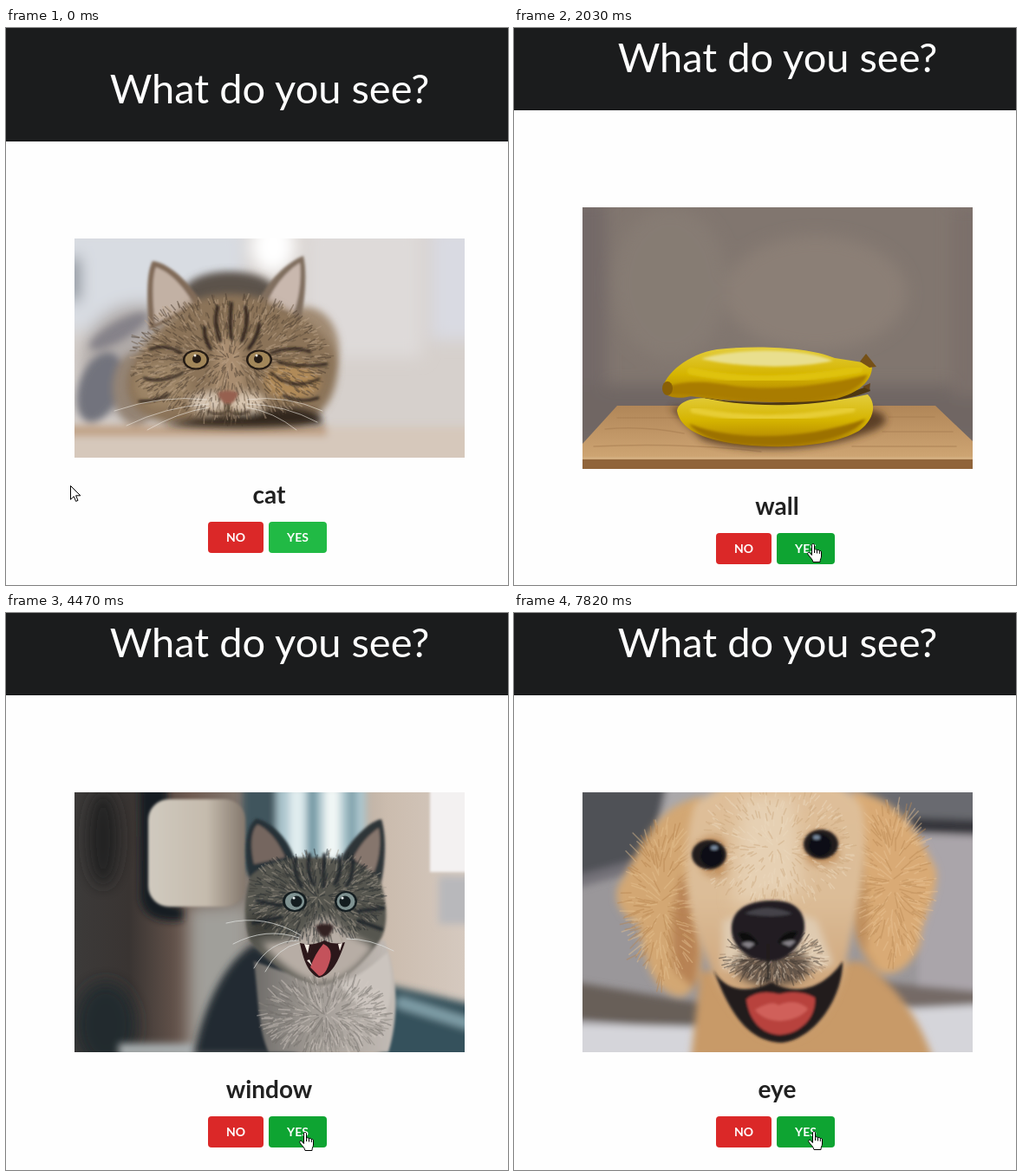
Write an HTML page that moves like this. It is 579 px wide and 643 px high and loops after 8 s.

```html
<!DOCTYPE html>
<html lang="en">
<head>
<meta charset="utf-8">
<title>What do you see?</title>
<style>
  html, body { margin: 0; width: 100%; height: 100%; overflow: hidden; background: #fefefe; }
  #stage { display: block; width: 100vw; height: 100vh; }
  text { font-family: Lato, "Open Sans", sans-serif; text-anchor: middle; }
  #title { font-size: 47px; fill: #fff; }
  #label { font-size: 28px; font-weight: 700; fill: #212121; }
  .btn { font-size: 14px; font-weight: 700; fill: #fff; }
  .pic { display: none; }
  .pic path { stroke-linecap: round; }
  .pic path:not([fill]) { fill: none; }
  [data-fur] { filter: url(#fuzz); stroke-width: 1.5; }
  .soft { filter: url(#soft); }
  .blur { filter: url(#blur); }
  .haze { filter: url(#haze); }
  .cursor { fill: #fff; stroke: #000; stroke-linejoin: round; }
</style>
</head>
<body>
<svg id="stage" viewBox="0 0 579 643">
  <defs>
    <filter id="fuzz"><feGaussianBlur stdDeviation=".7"/></filter>
    <filter id="soft"><feGaussianBlur stdDeviation="1.4"/></filter>
    <filter id="blur" x="-20%" y="-20%" width="140%" height="140%"><feGaussianBlur stdDeviation="4"/></filter>
    <filter id="haze" x="-30%" y="-30%" width="160%" height="160%"><feGaussianBlur stdDeviation="9"/></filter>
    <linearGradient id="wood" x2="0" y2="1"><stop stop-color="#b08658"/><stop offset="1" stop-color="#cfa674"/></linearGradient>
    <linearGradient id="peel" x2="0" y2="1"><stop stop-color="#e3cd3c"/><stop offset=".5" stop-color="#d5b400"/><stop offset="1" stop-color="#a97a02"/></linearGradient>
    <linearGradient id="room"><stop stop-color="#3c3a39"/><stop offset=".14" stop-color="#393432"/><stop offset=".3" stop-color="#705c52"/><stop offset=".5" stop-color="#8d8780"/><stop offset=".8" stop-color="#cbbcae"/><stop offset="1" stop-color="#d5c9bf"/></linearGradient>
    <linearGradient id="lamp"><stop stop-color="#d0cabf"/><stop offset=".6" stop-color="#c5bbad"/><stop offset="1" stop-color="#83776c"/></linearGradient>
    <linearGradient id="chest"><stop stop-color="#6d6b68"/><stop offset=".4" stop-color="#a09a94"/><stop offset="1" stop-color="#c3bcb6"/></linearGradient>
    <linearGradient id="face" x2="0" y2="1"><stop stop-color="#dfbf99"/><stop offset=".45" stop-color="#dcbd98"/><stop offset="1" stop-color="#c7996b"/></linearGradient>
  </defs>

  <rect id="head" width="579" fill="#1b1c1d"/>
  <text id="title" x="304">What do you see?</text>

  <!-- resting tabby -->
  <svg class="pic" x="79" y="243" width="450" height="253" viewBox="79 243 450 253">
    <rect x="79" y="243" width="450" height="253" fill="#d6d0cc"/>
    <g class="haze">
      <rect x="60" y="230" width="215" height="120" fill="#d8dce2"/>
      <rect x="345" y="230" width="135" height="150" fill="#dedad9"/>
      <rect x="490" y="230" width="60" height="130" fill="#d9dae2"/>
      <ellipse cx="308" cy="252" rx="26" ry="32" fill="#fff"/>
      <rect x="70" y="265" width="14" height="50" fill="#606a76"/>
      <ellipse cx="155" cy="385" rx="68" ry="67" fill="#b0aaa8"/>
    </g>
    <g class="blur">
      <rect x="70" y="460" width="470" height="45" fill="#d6c8bb"/>
      <rect x="70" y="459" width="300" height="12" fill="#bfa084"/>
      <ellipse cx="108" cy="415" rx="24" ry="42" fill="#72737d" transform="rotate(20 108 415)"/>
      <ellipse cx="130" cy="350" rx="38" ry="11" fill="#858289" transform="rotate(-30 130 350)"/>
      <ellipse cx="150" cy="416" rx="27" ry="42" fill="#948474"/>
      <ellipse cx="258" cy="305" rx="53" ry="24" fill="#5c534c"/>
      <ellipse cx="345" cy="370" rx="39" ry="48" fill="#a18b73"/>
    </g>
    <g class="soft">
      <path fill="#806b58" d="M165 349C162 310 162 282 169 269C192 272 216 300 228 321Z"/>
      <path fill="#c2b1a4" d="M172 341C168 308 169 286 173 276C192 283 207 302 217 320Z"/>
      <path fill="#806e5f" d="M288 322C300 292 325 270 343 263C348 285 344 320 339 341Z"/>
      <path fill="#c9b8ae" d="M300 320C309 296 327 278 339 271C341 288 338 315 331 330Z"/>
    </g>
    <path class="blur" fill="#8b7359" d="M207 322C228 302 288 302 316 322C348 336 382 360 382 390C383 426 363 454 332 459C290 463 215 462 184 456C150 447 134 428 142 398C153 368 176 344 207 322Z"/>
    <g class="blur">
      <ellipse cx="330" cy="408" rx="32" ry="21" fill="#b08a58"/>
      <ellipse cx="180" cy="412" rx="32" ry="26" fill="#9c8466"/>
      <path fill="#32281f" d="M182 458Q240 446 285 444Q325 430 362 446L365 457Q280 464 182 458Z"/>
      <ellipse cx="234" cy="432" rx="22" ry="12" fill="#d5c5b2"/>
      <ellipse cx="277" cy="432" rx="22" ry="12" fill="#d8c6b1"/>
      <path fill="#a98d6f" d="M244 355L268 355L276 415L256 432L238 414Z"/>
    </g>
    <g data-fur="258 382 112 70 1300 9 #43362b #bda489 #65523f"/>
    <g class="soft" fill="none" stroke="#2e241c" stroke-width="4">
      <path d="M229 346Q228 358 236 370M244 322Q239 343 247 361M260 318Q257 340 260 358M276 322Q281 340 272 361M292 342Q291 356 280 370"/>
      <path stroke-width="3" d="M202 375Q184 364 166 371M204 398Q181 411 159 404M306 375Q330 366 351 374M306 398Q330 420 361 405M315 386Q340 393 370 388M188 423Q174 431 154 431M320 424Q340 434 360 427"/>
    </g>
    <g fill="#241b14">
      <ellipse cx="219" cy="383" rx="15" ry="11.5"/><ellipse cx="292" cy="383" rx="15" ry="11.5"/>
      <g fill="#a18659"><ellipse cx="219" cy="383" rx="12.5" ry="9.5"/><ellipse cx="292" cy="383" rx="12.5" ry="9.5"/></g>
      <circle cx="220" cy="382" r="5"/><circle cx="291" cy="382" r="5"/>
      <g fill="#efe9df"><circle cx="218" cy="378" r="1.5"/><circle cx="289" cy="378" r="1.5"/></g>
    </g>
    <path class="soft" fill="#966150" d="M244 421Q256 416 268 421Q265 432 256 435Q247 432 244 421Z"/>
    <path class="soft" stroke="#37291f" stroke-width="2" d="M256 434V442Q245 449 232 442M256 442Q268 449 281 442"/>
    <path stroke="#eee9e2" stroke-width="1" opacity=".6" d="M232 429Q180 423 125 442M234 434Q184 437 139 459M234 438Q197 444 163 464M278 429Q323 423 365 442M278 434Q322 435 359 455M278 438Q309 443 335 464"/>
  </svg>

  <!-- fruit on a board -->
  <svg class="pic" x="79" y="207" width="450" height="302" viewBox="79 207 450 302">
    <rect x="79" y="207" width="450" height="302" fill="#81766f"/>
    <g class="haze">
      <rect x="60" y="200" width="46" height="260" fill="#736967"/>
      <rect x="60" y="412" width="490" height="70" fill="#706664"/>
      <ellipse cx="348" cy="306" rx="105" ry="66" fill="#8b7f76"/>
      <ellipse cx="180" cy="295" rx="66" ry="88" fill="#867b73"/>
      <rect x="505" y="205" width="40" height="220" fill="#7b706b"/>
    </g>
    <path fill="url(#wood)" d="M119 436H486L529 477V498H79V480Z"/>
    <path stroke="#a77d51" stroke-width="1.5" opacity=".55" d="M119 450H190M105 463Q150 459 196 468M92 483Q190 478 285 489M390 483H510M425 466H506M432 449H485"/>
    <rect x="79" y="497" width="450" height="12" fill="#90643a"/>
    <rect x="79" y="495" width="450" height="3" fill="#d2ad7e"/>
    <path class="blur" fill="#4c321e" opacity=".85" d="M180 438L410 440C442 448 430 461 400 470C350 490 260 491 217 475Z"/>
    <path fill="url(#peel)" d="M188 442C190 428 216 424 242 430C300 437 366 433 408 423C419 434 415 453 398 465C367 483 310 486 265 481C219 476 192 464 188 442Z"/>
    <path class="soft" fill="#9c7103" d="M202 457C250 476 330 478 406 451C390 475 330 484 275 481C235 480 211 469 202 457Z"/>
    <path class="soft" stroke="#e7cd36" stroke-width="7" d="M207 441Q290 459 390 440"/>
    <path fill="#4e3711" d="M212 425C270 438 360 434 409 413L411 419C360 440 260 439 212 425Z"/>
    <path fill="url(#peel)" d="M172 416C173 401 200 376 234 371C280 366 338 368 370 381L402 386L413 389C414 407 398 421 372 428C330 435 250 432 204 425C184 430 171 424 172 416Z"/>
    <path class="soft" fill="#e9df8e" d="M216 382C250 370 330 368 368 384C320 395 255 391 216 382Z"/>
    <path class="soft" fill="#a97c03" d="M177 414C200 406 225 408 258 414C300 419 360 413 408 400C400 419 370 428 330 430C265 432 225 423 178 423Z"/>
    <path class="soft" stroke="#dfc20f" stroke-width="8" d="M204 396Q290 415 398 394"/>
    <path fill="#765117" d="M399 385L406 376L418 391L410 392Z"/>
    <path fill="#66451c" d="M402 414L411 410L410 418Z"/>
    <ellipse cx="177" cy="416" rx="6" ry="8" fill="#896006"/>
  </svg>

  <!-- meowing cat -->
  <svg class="pic" x="79" y="207" width="450" height="300" viewBox="79 207 450 300">
    <rect x="79" y="207" width="450" height="300" fill="url(#room)"/>
    <g class="haze">
      <ellipse cx="112" cy="260" rx="18" ry="55" fill="#202324"/>
      <ellipse cx="115" cy="475" rx="35" ry="49" fill="#20292d"/>
      <rect x="211" y="338" width="70" height="180" fill="#a09f9a"/>
    </g>
    <g class="blur">
      <path fill="#121b20" d="M154 200H186V335L204 340V355Q160 360 155 330Z"/>
      <rect x="273" y="200" width="41" height="100" fill="#40555d"/>
      <rect x="312" y="200" width="103" height="100" fill="#acc6ce"/>
      <rect x="327" y="200" width="17" height="90" fill="#e1edef"/>
      <rect x="349" y="200" width="9" height="90" fill="#668e9a"/>
      <rect x="367" y="200" width="18" height="85" fill="#f1f7f6"/>
      <rect x="395" y="200" width="8" height="75" fill="#7599a3"/>
      <rect x="499" y="304" width="40" height="55" fill="#b8b8bb"/>
      <path fill="#36515c" d="M440 429L540 452V520H430Z"/>
      <path stroke="#809fa8" stroke-width="13" d="M456 450L540 476"/>
      <rect x="130" y="497" width="90" height="15" fill="#a9afb0"/>
    </g>
    <g class="soft">
      <rect x="164" y="215" width="112" height="124" rx="24" fill="url(#lamp)"/>
      <rect x="489" y="200" width="45" height="99" fill="#f3f1f1"/>
    </g>
    <path class="blur" fill="#202c32" d="M217 510C226 459 252 400 287 382L345 430L335 510Z"/>
    <g class="soft">
      <path fill="url(#chest)" d="M286 402C291 444 291 482 303 507H441C452 473 454 419 436 377L350 425Z"/>
      <path fill="#cbc4be" d="M385 428C414 417 431 399 440 392C449 430 444 460 430 476Q407 455 385 428Z"/>
      <path fill="#273137" d="M281 307C273 277 276 245 289 237C308 242 327 263 333 284Z"/>
      <path fill="#75665e" d="M286 290C281 267 283 251 290 244C304 250 316 267 322 282Z"/>
      <path fill="#2e3538" d="M386 284C397 262 419 240 433 238C440 260 437 297 430 322Z"/>
      <path fill="#86766d" d="M400 284C408 266 422 253 430 248C433 266 430 287 424 300Z"/>
      <path fill="#57564f" d="M282 304C310 275 397 273 431 307C440 335 443 366 427 384C408 409 385 430 360 430C333 426 300 402 281 378C273 354 275 326 282 304Z"/>
    </g>
    <g class="blur">
      <path fill="#b7ada5" d="M359 352L376 352L394 370Q415 379 424 386C408 408 385 428 361 428C338 424 308 399 295 380Q325 382 346 367Z"/>
      <path fill="#3c3c39" d="M281 345L318 352L309 370L284 374Z"/>
    </g>
    <g data-fur="359 328 75 50 850 9 #1f272a #a49b8e #3a3b38"/>
    <g data-fur="368 464 70 40 600 13 #6d6964 #d2cbc4 #8d8882"/>
    <g class="soft" fill="none" stroke="#20272a" stroke-width="4">
      <path d="M334 284Q331 301 341 316M350 279Q346 299 355 314M367 279Q367 300 366 316M384 281Q389 298 379 313M400 285Q401 302 393 315M317 338L289 332M318 351L285 358M407 344L435 341M406 355L433 365"/>
    </g>
    <g fill="#141d20">
      <ellipse cx="333" cy="333" rx="14" ry="12"/><ellipse cx="392" cy="333" rx="13" ry="12"/>
      <g fill="#7f9291"><ellipse cx="333" cy="333" rx="11" ry="10"/><ellipse cx="392" cy="333" rx="10.5" ry="10"/></g>
      <circle cx="335" cy="333" r="6.5"/><circle cx="391" cy="333" r="6.5"/>
      <g fill="#e8efee"><circle cx="332" cy="329" r="1.6"/><circle cx="388" cy="329" r="1.6"/></g>
    </g>
    <path class="soft" fill="#332323" d="M357 361Q368 356 378 361Q376 371 368 375Q360 372 357 361Z"/>
    <path fill="#2c171a" d="M339 381Q354 385 367 378Q379 384 391 380C386 395 378 418 361 421C348 416 343 400 339 381Z"/>
    <path fill="#c4525b" d="M351 409Q356 394 366 382Q377 387 374 400Q369 419 361 419Z"/>
    <path fill="#f2eae1" d="M344 382L350 383L348 393ZM383 382L388 381L385 390ZM347 401L350 400L353 407Z"/>
    <path stroke="#dfe2df" stroke-width="1" opacity=".75" d="M340 372Q298 347 254 358M338 375Q300 362 262 382M337 378Q304 378 286 410M338 381Q313 386 299 414M393 376Q420 376 447 390"/>
  </svg>

  <!-- cat looking up -->
  <svg class="pic" x="79" y="207" width="450" height="300" viewBox="79 207 450 300">
    <rect x="79" y="207" width="450" height="300" fill="#2e2323"/>
    <g class="haze">
      <rect x="70" y="200" width="75" height="180" fill="#160e0f"/>
      <ellipse cx="202" cy="220" rx="45" ry="32" fill="#50453f"/>
      <path fill="#62564f" d="M245 190H455C496 260 480 326 436 372L370 330Z"/>
      <path fill="#443635" d="M70 432Q250 396 540 462V520H70Z"/>
      <rect x="496" y="195" width="50" height="180" fill="#1c1214"/>
      <ellipse cx="180" cy="311" rx="22" ry="48" fill="#63574f"/>
    </g>
    <path class="blur" stroke="#392e2b" stroke-width="8" opacity=".7" d="M410 213Q431 250 413 294M438 220Q456 272 432 322M463 240Q474 281 451 334"/>
    <path class="blur" stroke="#584747" stroke-width="4" d="M90 459Q145 441 202 475M102 493Q169 461 224 501M298 474Q350 500 420 476M361 498Q429 467 496 494M437 441Q481 442 517 470"/>
    <path class="blur" fill="#82756a" d="M190 304C201 280 236 261 262 250C303 236 341 249 376 275C401 297 407 334 393 370C380 398 346 433 300 440C260 443 223 429 210 396C192 365 184 332 190 304Z"/>
    <g class="soft">
      <path fill="#8c7b72" d="M195 314C170 291 158 258 156 240C158 230 176 232 192 235C212 243 231 257 244 270Z"/>
      <path fill="#c9bfc0" d="M197 306C176 285 164 259 162 241C177 237 207 248 235 270Q207 278 197 306Z"/>
      <path fill="#8c7b71" d="M324 266C342 235 376 205 399 207C402 231 396 268 390 288Z"/>
      <path fill="#c0b4b2" d="M340 259C357 233 378 216 393 213C395 238 389 263 384 276Q367 252 340 259Z"/>
    </g>
    <g class="blur">
      <path fill="#ad9e92" d="M278 346L316 341C320 371 331 390 343 404L306 443C263 442 234 423 223 395L286 386Z"/>
      <ellipse cx="237" cy="420" rx="22" ry="17" fill="#f4f1f3"/>
      <ellipse cx="287" cy="429" rx="37" ry="15" fill="#e9e3e1"/>
      <ellipse cx="371" cy="434" rx="31" ry="24" fill="#dcd6d6"/>
      <ellipse cx="364" cy="441" rx="20" ry="17" fill="#fff"/>
      <path fill="#eee8e3" d="M205 370L238 380L258 396L226 395Z"/>
      <path fill="#e2dad4" d="M274 345L283 350L280 380L271 372Z"/>
    </g>
    <g data-fur="294 332 98 76 1250 9 #4d433d #b7aa9d #6b6058"/>
    <g class="soft" fill="none" stroke="#302722" stroke-width="3.5">
      <path d="M257 249Q252 280 278 313M270 244Q269 280 288 326M284 240Q285 287 296 328M298 239Q301 286 304 326M310 245Q320 284 311 322M326 255Q335 286 319 317"/>
      <path stroke-width="3" d="M237 334Q212 325 191 335M234 351Q211 350 196 361M363 326Q385 320 398 331M363 342Q384 344 398 354M355 361Q374 360 383 373"/>
    </g>
    <g fill="#171b1a">
      <ellipse cx="255" cy="354" rx="19" ry="16" transform="rotate(18 255 354)"/>
      <ellipse cx="342" cy="340" rx="18" ry="16" transform="rotate(-28 342 340)"/>
      <g fill="#9aab98"><circle cx="255" cy="353" r="14.5"/><circle cx="342" cy="339" r="14.5"/></g>
      <ellipse cx="255" cy="351" rx="5" ry="8"/><ellipse cx="341" cy="337" rx="5" ry="8"/>
      <g fill="#eef3ee"><circle cx="251" cy="347" r="2.5"/><circle cx="338" cy="332" r="2.5"/></g>
    </g>
    <path class="soft" fill="#a87867" d="M293 405Q307 401 320 402Q317 414 309 419Q299 414 293 405Z"/>
    <path class="soft" stroke="#66534b" stroke-width="2" d="M301 412L309 419L316 410M309 420Q306 428 296 430"/>
    <path stroke="#d6ced0" stroke-width="1" opacity=".55" d="M258 318Q251 250 258 207M317 292Q312 252 306 211M340 301Q370 284 408 289M226 405Q170 425 113 422M232 421Q175 440 139 497M241 426Q193 442 164 488M255 429Q224 459 207 507M266 431Q230 474 214 505M274 435Q254 457 248 482M358 394Q410 351 465 382M365 401Q426 387 505 360M362 402Q420 406 493 415M367 405Q423 417 467 438M376 409Q434 432 467 489M383 415Q417 444 428 490M208 376Q180 371 150 345"/>
  </svg>

  <!-- smiling dog -->
  <svg class="pic" x="79" y="207" width="450" height="300" viewBox="79 207 450 300">
    <rect x="79" y="207" width="450" height="300" fill="#9a979a"/>
    <g class="blur">
      <path fill="#505157" d="M70 200H178L170 285L70 309Z"/>
      <path fill="#aaa8aa" d="M176 200H245V250H165Z"/>
      <path fill="#737178" d="M70 304L158 280V294L70 318Z"/>
      <path fill="#696a70" d="M400 200H540V250L420 238Z"/>
      <path fill="#35363b" d="M455 236L540 239V257L463 253Z"/>
      <rect x="466" y="257" width="75" height="180" fill="#aaa5aa"/>
      <path fill="#675e59" d="M70 426L220 451V484L70 469Z"/>
      <path fill="#756b66" d="M410 425L540 437V459L410 455Z"/>
      <path fill="#d5d5da" d="M70 474L220 478V520H70ZM430 458L540 452V520H420Z"/>
    </g>
    <g class="blur">
      <path fill="#c89a68" d="M204 514L215 414L400 402C438 425 467 467 483 514Z"/>
      <path fill="#d3a773" d="M218 212C162 221 151 265 120 315C113 336 127 351 143 359C149 399 160 441 194 443C221 432 222 381 212 331Z"/>
      <path fill="#d9aa75" d="M389 206C442 210 466 253 487 296C491 328 468 355 469 382C456 413 435 421 421 414C394 396 386 350 380 300Z"/>
      <path fill="#b88355" d="M194 301Q177 353 185 413L207 433Q221 380 205 323Z"/>
      <path fill="#c0905f" d="M395 270Q414 325 407 390L422 413Q390 387 383 320Z"/>
    </g>
    <g data-fur="170 335 36 88 260 18 #e5c090 #b5844f"/>
    <g data-fur="437 310 36 86 260 18 #e8c394 #bb8a56"/>
    <g class="blur">
      <path fill="url(#face)" d="M208 222C238 195 281 190 306 190C340 190 390 196 402 226C412 294 394 341 382 410C365 472 336 494 307 494C271 490 239 446 220 393C195 340 193 272 208 222Z"/>
      <path fill="#c59563" d="M207 270Q226 246 245 264L246 302Q233 311 217 299ZM331 264Q351 238 374 261L375 285Q354 297 336 287Z"/>
      <path fill="#dfcbb1" d="M241 355Q300 332 349 355L368 405Q306 428 240 410Z"/>
      <ellipse cx="298" cy="408" rx="45" ry="24" fill="#645448"/>
    </g>
    <path class="haze" fill="#e6d0b3" d="M262 212H322L332 315Q320 328 290 328L254 338Z"/>
    <g data-fur="302 270 88 66 450 9 #ecd9bf #cba67c"/>
    <g data-fur="300 398 58 28 400 9 #ecdac4 #3f352f #9d8168"/>
    <g class="soft">
      <g fill="#211b1d">
        <ellipse cx="225" cy="279" rx="20" ry="17"/><ellipse cx="354" cy="267" rx="20" ry="17"/>
        <g fill="#0e1016"><circle cx="228" cy="280" r="13"/><circle cx="353" cy="268" r="13"/></g>
        <g fill="#7b8ca1"><ellipse cx="231" cy="271" rx="4" ry="2.5"/><ellipse cx="349" cy="259" rx="4" ry="2.5"/></g>
      </g>
      <path fill="#201c1e" d="M230 412C241 433 265 442 297 426C326 443 358 433 379 402C380 441 349 492 309 496C268 495 248 459 230 412Z"/>
      <path fill="#b8423d" d="M268 446Q282 434 306 440Q329 434 347 444C349 468 329 486 307 487C285 486 271 470 268 446Z"/>
      <path fill="#d0605a" d="M278 458Q299 446 305 453Q325 444 339 457Q330 469 307 471Q287 470 278 458Z"/>
      <path fill="#201e22" d="M251 361C253 339 275 332 298 332C324 331 337 345 335 366C331 388 310 403 293 402C269 400 249 385 251 361Z"/>
      <path fill="#45434a" d="M266 347Q291 334 321 347Q300 353 266 347Z"/>
      <path fill="#09090b" d="M258 370Q272 365 282 382L270 387ZM328 368Q313 365 304 380L314 386Z"/>
      <path fill="#858187" d="M262 382Q270 377 278 382L271 387ZM308 381Q319 376 325 379L318 385Z"/>
      <path stroke="#1a1718" stroke-width="2" d="M293 382V423"/>
    </g>
  </svg>

  <text id="label" x="303.5"></text>
  <g id="buttons">
    <rect x="233" width="64" height="36" rx="4" fill="#db2828"/>
    <text class="btn" x="265" y="23">NO</text>
    <rect id="yes" x="303" width="67" height="36" rx="4"/>
    <text class="btn" x="336.5" y="23">YES</text>
  </g>
  <path id="arrow" class="cursor" d="M.5 .5V16.3L4.2 12.7L6.6 18.4L9 17.4L6.6 11.8H11.8Z"/>
  <g id="hand" class="cursor">
    <path d="M5.5 13.5V2C5.5 0 8.5 0 8.5 2V7.5C9 6.3 11.3 6.5 11.5 8C12 7 14 7.2 14.3 8.8C15 8 16.5 8.5 16.5 10V15C16.5 17 15 18 15 21.5H7C6.5 18 3 16 1 12.5C0 10.5 2 9.5 3.2 10.8Z"/>
    <path fill="none" d="M8.5 7.5V11M11.5 8V11.5M14.3 8.8V12"/>
  </g>
</svg>
<script>
const LOOP = 8000;
const $ = id => document.getElementById(id);
const pics = [...document.querySelectorAll('.pic')];

// time, picture, picture top, picture bottom, label
const scenes = [
  [0, 0, 243, 496, 'cat'],
  [2030, 1, 207, 509, 'wall'],
  [4470, 2, 207, 507, 'window'],
  [6110, 3, 207, 507, 'cat'],
  [7820, 4, 207, 507, 'eye']
];

// time, cursor, left, top
const moves = [
  [0, 'arrow', 74, 528], [430, 'arrow', 92, 548],
  [570, 'arrow', 158, 600], [700, 'arrow', 233, 630],
  [840, 'arrow', 262, 622], [960, 'arrow', 286, 608],
  [1080, 'hand', 304, 592], [1200, 'hand', 318, 583],
  [1320, 'hand', 331, 590], [1440, 'hand', 337, 595],
  [1880, 'hand', 338, 595], [3630, 'hand', 339, 597],
  [4470, 'hand', 338, 599], [5990, 'hand', 339, 598]
];

const greens = [[0, '#21ba45'], [1080, '#16ab39'], [2030, '#0ea432']];

const stepAt = (table, t) => table.filter(row => row[0] <= t).pop();

function randomizer(seed) {
  return () => (seed = (seed * 16807) % 2147483647) / 2147483647;
}

// Short hairs fanning out from the middle of an ellipse.
function growFur(group) {
  const [cx, cy, rx, ry, count, size, ...colors] = group.dataset.fur.split(' ');
  const rand = randomizer(73);
  const strands = colors.map(() => '');
  for (let i = 0; i < count; i++) {
    const a = rand() * Math.PI * 2;
    const r = Math.sqrt(rand());
    const len = size * (0.4 + rand() * 0.6);
    const x = +cx + Math.cos(a) * rx * r;
    const y = +cy + Math.sin(a) * ry * r;
    const turn = a + (rand() - 0.5) * 0.6;
    const dx = Math.cos(turn) * len;
    const dy = Math.sin(turn) * len;
    strands[i % colors.length] += `M${x.toFixed(1)} ${y.toFixed(1)}l${dx.toFixed(1)} ${dy.toFixed(1)}`;
  }
  colors.forEach((color, i) => {
    const path = document.createElementNS('http://www.w3.org/2000/svg', 'path');
    path.setAttribute('d', strands[i]);
    path.setAttribute('stroke', color);
    path.setAttribute('opacity', 0.45);
    group.append(path);
  });
}

function draw(t) {
  const [, index, top, bottom, label] = stepAt(scenes, t);
  const [, kind, x, y] = stepAt(moves, t);
  pics.forEach((pic, i) => { pic.style.display = i === index ? 'inline' : 'none'; });
  $('head').setAttribute('height', top - 112);
  $('title').setAttribute('y', top - 156);
  $('label').setAttribute('y', bottom + 53);
  $('label').textContent = label;
  $('buttons').setAttribute('transform', `translate(0 ${bottom + 74})`);
  $('yes').setAttribute('fill', stepAt(greens, t)[1]);
  for (const id of ['arrow', 'hand']) {
    $(id).style.display = id === kind ? 'inline' : 'none';
    $(id).setAttribute('transform', `translate(${x} ${y})`);
  }
}

document.querySelectorAll('[data-fur]').forEach(growFur);

const start = performance.now();
function tick() {
  draw((performance.now() - start) % LOOP);
  requestAnimationFrame(tick);
}
tick();
</script>
</body>
</html>
```
